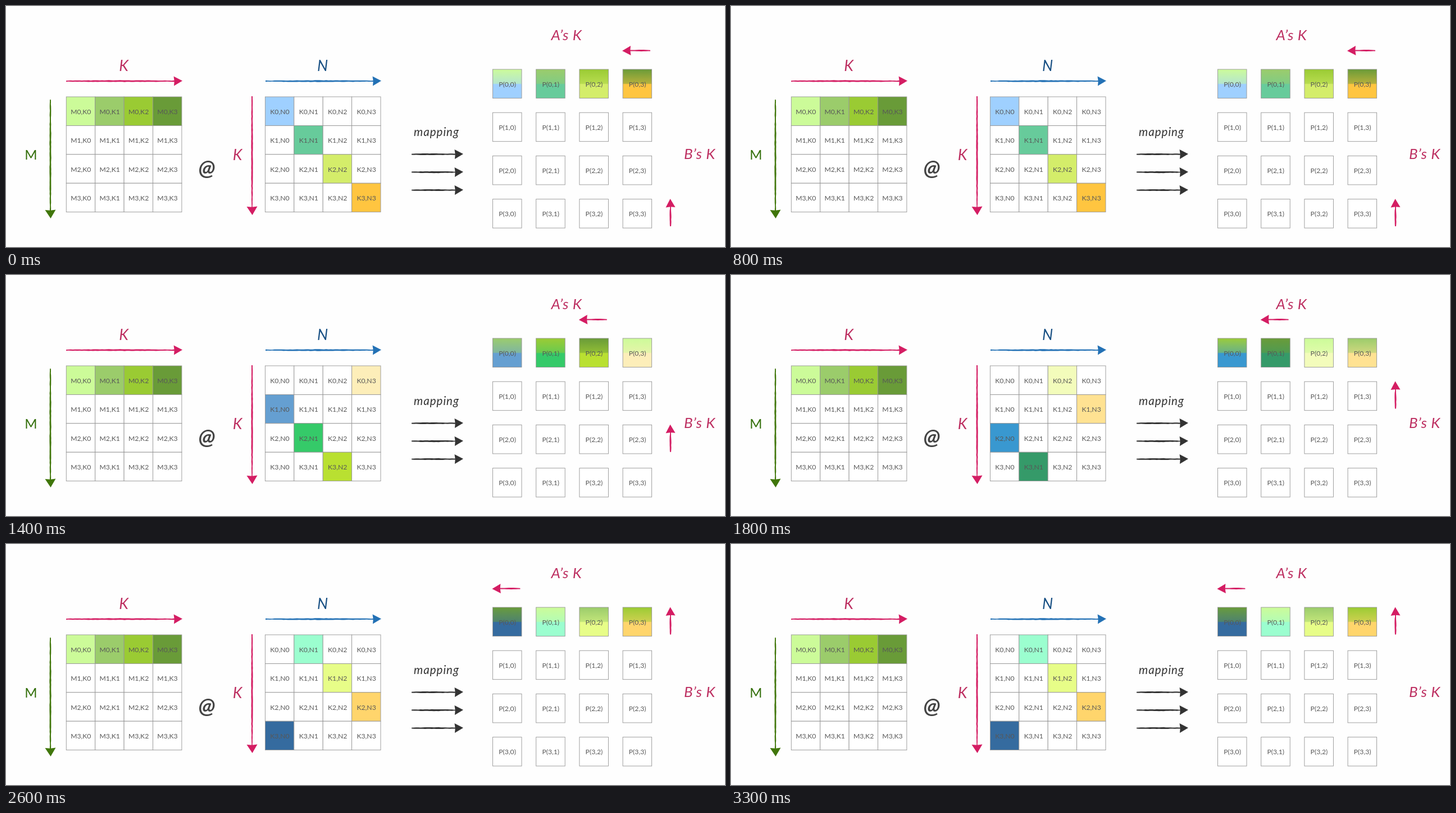
Recreate the animation shown at these times as an HTML page. Size 1280 by 430 pixels, loop 3.4 s.

```html
<!DOCTYPE html>
<html lang="en">
<head>
<meta charset="utf-8">
<title>Matrix mapping</title>
<style>
  html, body { margin: 0; width: 100%; height: 100%; overflow: hidden; background: #fefefe; }
  svg { display: block; width: 100%; height: 100%; }
  text { font: italic 400 27px Lato, "Open Sans", sans-serif; text-anchor: middle; }
  text.cell { font-size: 12.2px; font-style: normal; fill: #585858; }
  text.phrase { font-size: 26px; letter-spacing: .6px; }
  text.upright { font-size: 24px; font-style: normal; }
  text.word { font-size: 20.5px; letter-spacing: 1px; }
  text.at { font-size: 39px; font-weight: 700; }
  rect { stroke: #959595; stroke-width: .9; }
</style>
</head>
<body>
<svg viewBox="0 0 1280 430"></svg>
<script>
const LOOP = 3400, STEP = LOOP / 4, GAP = 77.2, SIDE = 51.4;
const PINK = '#d41d63', ROSE = '#bd2f61', BLUE = '#2371b5', GREEN = '#40760a', INK = '#333';
const leftRow = ['#ccfb99', '#9bcc6b', '#9acb33', '#699b38'];
// Colours of the right matrix's diagonal, one row per step
const diagonals = [
  ['#9fd0ff', '#67cb9b', '#d4ed6a', '#ffc540'],
  ['#659fd1', '#35ca69', '#b9e031', '#fdeeb9'],
  ['#3998d0', '#359a69', '#f3fcbb', '#ffe292'],
  ['#356b9f', '#9bfecf', '#e7fd88', '#ffd56c']
];

const svg = document.querySelector('svg');
let seed = 7;
const random = () => (seed = seed * 16807 % 2147483647) / 2147483647;

function add(tag, attrs, parent = svg) {
  const el = document.createElementNS('http://www.w3.org/2000/svg', tag);
  for (const key in attrs) el.setAttribute(key, attrs[key]);
  return parent.appendChild(el);
}

function label(str, x, y, fill, cls = '') {
  add('text', { x, y, fill, class: cls }).textContent = str;
}

function cell(x, y, size, str) {
  const box = add('rect', { x, y, width: size, height: size, fill: '#fff' });
  label(str, x + size / 2 + .3, y + size / 2 + 5, '', 'cell');
  return box;
}

function grid(x0, y0, step, size, name) {
  return [0, 1, 2, 3].map(r => [0, 1, 2, 3].map(c =>
    cell(x0 + c * step, y0 + r * step, size, name(r, c))));
}

// Chalky arrow from (x, y), drawn to the right and then rotated
function arrow(x, y, length, angle, fill, half = 8.5) {
  const top = [], bottom = [], neck = length - 15;
  for (let i = 0; i <= neck; i += 4) {
    const w = .7 + .5 * Math.sin(Math.PI * i / neck);
    top.push(`${i},${-w - random() * .5}`);
    bottom.unshift(`${i},${w + random() * .5}`);
  }
  const group = add('g', { fill, transform: `translate(${x} ${y}) rotate(${angle})` });
  add('polygon', { points: [...top, `${neck + 2},-1 ${neck + 2},1`, ...bottom].join(' ') }, group);
  add('path', { d: `M${neck - .5} ${-half}L${length} -.5 ${neck} ${half}L${neck + .7} 0Z` }, group);
  return group;
}

const left = grid(107.3, 162, SIDE, SIDE, (r, c) => `M${r},K${c}`);
const right = grid(461.4, 162, SIDE, SIDE, (r, c) => `K${r},N${c}`);
const product = grid(866.5, 113, GAP, 51.5, (r, c) => `P(${r},${c})`);
leftRow.forEach((color, c) => left[0][c].setAttribute('fill', color));

label('K', 209.5, 115.5, ROSE);
label('N', 563.5, 115.5, '#174f83');
label('M', 44.5, 274, '#34700c', 'upright');
label('K', 412, 275, ROSE);
label('@', 357.5, 301.5, '#444', 'at');
label('mapping', 766.5, 231.5, INK, 'word');
label('A’s K', 998, 60.5, ROSE, 'phrase');
label('B’s K', 1235, 272.5, ROSE, 'phrase');

arrow(107, 134, 207, 0, PINK);
arrow(462, 134, 206, 0, BLUE);
arrow(79, 167, 212, 90, GREEN, 9.5);
arrow(438, 161, 212, 90, PINK, 9.5);
for (const y of [264.5, 296.5, 328.5]) arrow(722, y, 92, 0, INK);
const across = add('g');
across.append(arrow(1147, 79.5, 50, 180, PINK));
const upward = add('g');
upward.append(arrow(1183, 393, 49, -90, PINK));

const stops = product[0].map((box, c) => {
  const fill = add('linearGradient', { id: 'mix' + c, x2: 0, y2: 1 });
  box.setAttribute('fill', `url(#mix${c})`);
  return [0, .49, .52].map(offset => add('stop', { offset }, fill));
});

function show(step) {
  right.flat().forEach(box => box.setAttribute('fill', '#fff'));
  diagonals[step].forEach((low, c) => {
    const k = (c + step) % 4, high = leftRow[k];
    right[k][c].setAttribute('fill', low);
    const blend = `color-mix(in srgb, ${high}, ${low})`;
    [high, blend, low].forEach((color, i) => stops[c][i].style.stopColor = color);
  });
  across.setAttribute('transform', `translate(${-GAP * step} 0)`);
  upward.setAttribute('transform', `translate(0 ${-GAP * step})`);
}

let start, shown = -1;
function tick(now) {
  start ??= now;
  const step = Math.floor((now - start) % LOOP / STEP);
  if (step !== shown) show(shown = step);
  requestAnimationFrame(tick);
}
show(0);
requestAnimationFrame(tick);
</script>
</body>
</html>
```
